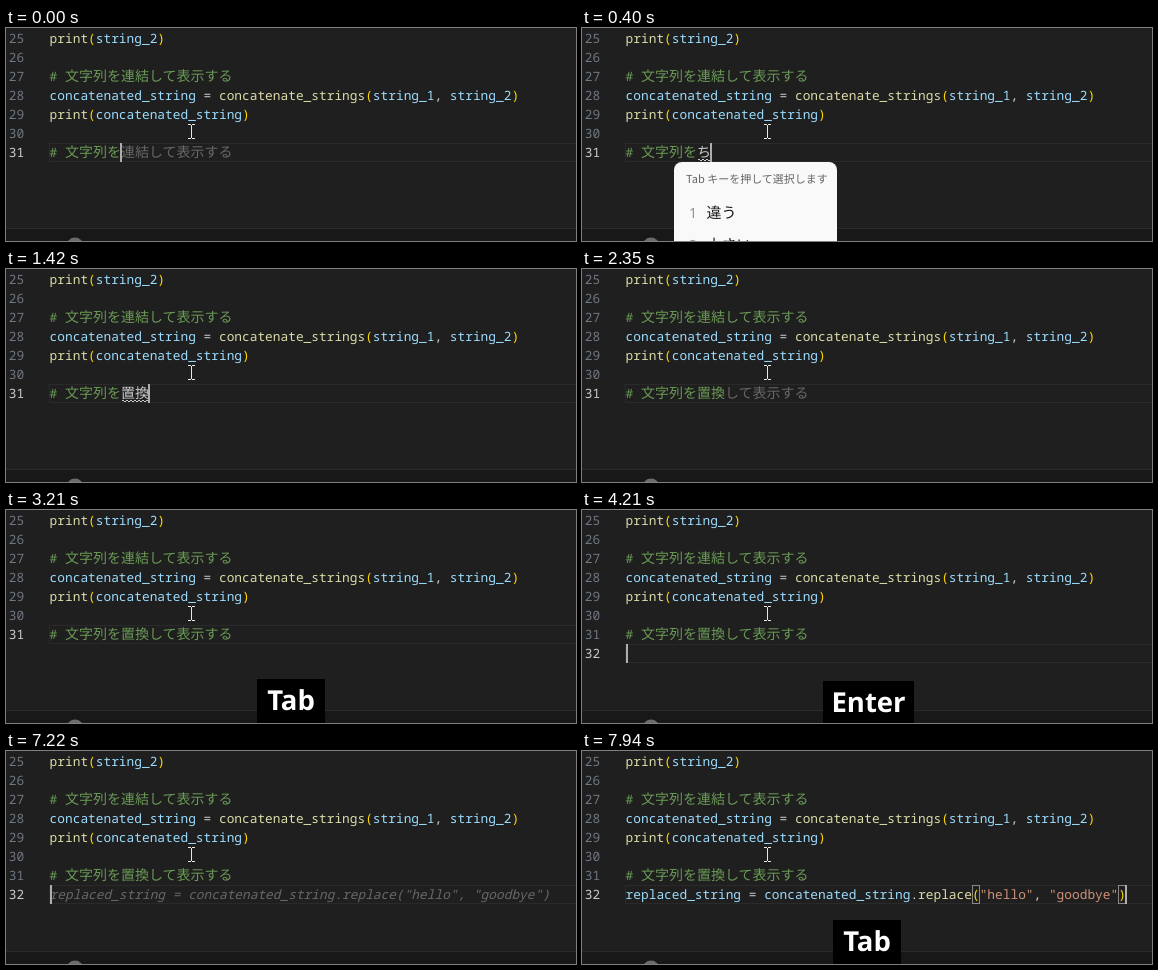
Write an HTML page with a canvas that moves like this. It is 570 px wide and 213 px high and loops after 8000 ms.

```html
<!DOCTYPE html>
<html lang="ja">
<head>
<meta charset="utf-8">
<style>
  html, body { margin: 0; width: 100%; height: 100%; overflow: hidden; background: #1f1f1f; }
  canvas { display: block; }
</style>
</head>
<body>
<canvas id="stage" width="570" height="213"></canvas>
<script>
const ctx = document.getElementById('stage').getContext('2d');
const LOOP = 8000, LEFT = 43.6, ROW = 19, CHAR = 7.7;
const MONO = '12.83px "Noto Sans Mono", monospace';
const KANJI = '14px "Noto Sans CJK JP", sans-serif';
const FG = '#cccccc', GHOST = '#686868', COMMENT = '#6a9955', GOLD = '#ffd700', BLUE = '#9cdcfe';
const NEW_CODE = 'replaced_string = concatenated_string.replace("hello", "goodbye")';

// Times at which the caret flips, starting visible
const BLINKS = [70, 330, 2350, 2680, 3210, 3680, 4740, 5210, 5670, 6220, 6690, 7220];
// [start, typed text, suggested rest]
const TYPING = [
  [0, '', '連結して表示する'], [330, 'ｔ', ''], [400, 'ち', ''], [800, 'ちｋ', ''], [870, 'ちか', ''],
  [1000, 'ちかｎ', ''], [1130, 'ちかん', ''], [1350, '置換', ''], [1620, '置換', 'して表示する'],
  [2680, '置換して表示する', '']
];
// [key, start, end, box x, box y, box width]
const KEYS = [
  ['Tab', 2680, 3610, 251, 169, 68], ['Enter', 4210, 5140, 241, 171, 91], ['Tab', 7480, LOOP, 251, 169, 68]
];

const rowTop = line => 1 + (line - 25) * ROW;
const baseline = line => rowTop(line) + 14;

function rect(x, y, w, h, color) {
  ctx.fillStyle = color;
  ctx.fillRect(x, y, w, h);
}

function frame(x, y, w, h, color) {
  ctx.strokeStyle = color;
  ctx.strokeRect(x + .5, y + .5, w - 1, h - 1);
}

function text(str, x, y, color, font = MONO) {
  ctx.font = font;
  ctx.fillStyle = color;
  ctx.fillText(str, x, y);
  return x + ctx.measureText(str).width;
}

function tokenColor(token, next, variable) {
  if (token[0] === '"') return '#ce9178';
  if (/[()]/.test(token)) return GOLD;
  if (/\w/.test(token)) return next === '(' ? '#dcdcaa' : variable;
  return FG;
}

function code(source, line, variable = BLUE) {
  let x = LEFT;
  for (const { 0: token, index } of source.matchAll(/"[^"]*"|\w+|[()]|[^\w"()]+/g)) {
    const next = source[index + token.length];
    x = text(token, x, baseline(line), tokenColor(token, next, variable));
  }
}

function comment(str, line) {
  const x = text('# ', LEFT, baseline(line), COMMENT);
  return text(str, x, baseline(line), COMMENT, KANJI);
}

function caret(x, line) {
  rect(x, rowTop(line), 2, ROW, '#aeafad');
}

function mouse() {
  rect(185, 97, 1, 13, '#e8e8e8');
  for (const y of [96, 110]) {
    rect(182, y, 3, 1, '#e8e8e8');
    rect(186, y, 3, 1, '#e8e8e8');
  }
}

function typedLine(t, blink) {
  const [, typed, rest] = TYPING.findLast(step => t >= step[0]);
  const composing = t >= 330 && t < 1890;
  const start = comment('文字列を', 31);
  const end = text(typed, start, baseline(31), composing ? FG : COMMENT, KANJI);
  text(rest, end, baseline(31), GHOST, KANJI);
  if (composing) {
    for (let x = Math.round(start) + 1; x < end - 1; x += 2) rect(x, 131 + (x >> 1) % 2, 2, 1, FG);
  }
  if (blink && t < 4210) caret(Math.round(end) - 1, 31);
}

function candidates(t) {
  const wide = t >= 1200;
  const words = wide ? ['置換', '置換術'] : t < 870 ? ['違う', '小さい'] : ['近く', '近い'];
  ctx.fillStyle = '#f9f9f9';
  ctx.beginPath();
  ctx.roundRect(92, 134, wide ? 178 : 163, 100, 8);
  ctx.fill();
  text('Tab キーを押して選択します', 104, 155, '#666666', '11px "Noto Sans CJK JP", sans-serif');
  words.forEach((word, i) => {
    const y = 190 + i * 32;
    text(i + 1, 107, y, '#8a8a8a', '14px "Open Sans", sans-serif');
    text(word, 124.5, y, '#1c1c1c', '15px "Noto Sans CJK JP", sans-serif');
  });
}

function newLine(t, blink) {
  if (t >= 7480) {
    code(NEW_CODE, 32, t < 7940 ? FG : BLUE);
    if (t >= 7550) {
      for (const col of [NEW_CODE.indexOf('('), NEW_CODE.length - 1]) {
        frame(Math.round(LEFT + col * CHAR), rowTop(32), 8, ROW, '#888888');
      }
    }
  } else if (t >= 4670) {
    text(NEW_CODE, LEFT, baseline(32), GHOST, 'italic ' + MONO);
  }
  if (blink) caret(t < 7480 ? 44 : 543, 32);
}

function keyLabel([key, start, end, x, y, w], t) {
  if (t < start || t >= end) return;
  rect(x, y, w, 213 - y, '#000000');
  ctx.textAlign = 'center';
  text(key, x + w / 2, y + 31, '#ffffff', 'bold 27.5px "Open Sans", sans-serif');
  ctx.textAlign = 'left';
}

function draw(t) {
  const blink = BLINKS.filter(time => t >= time).length % 2 === 0;
  const current = t < 4210 ? 31 : 32;

  rect(0, 0, 570, 213, '#1f1f1f');
  rect(0, 200, 570, 13, '#181818');
  rect(0, 200, 570, 1, '#2b2b2b');
  ctx.fillStyle = '#6b6b6b';
  ctx.beginPath();
  ctx.arc(69, 218, 8.5, 0, 7);
  ctx.fill();

  frame(43, rowTop(current), 530, ROW, '#2a2a2a');
  for (let line = 25; line <= current; line++) {
    text(line, 2.8, baseline(line), line === current ? FG : '#6e7681');
  }
  code('print(string_2)', 25);
  comment('文字列を連結して表示する', 27);
  code('concatenated_string = concatenate_strings(string_1, string_2)', 28);
  code('print(concatenated_string)', 29);
  mouse();

  typedLine(t, blink);
  if (t >= 400 && t < 1420) candidates(t);
  if (t >= 4210) newLine(t, blink);
  KEYS.forEach(key => keyLabel(key, t));
}

ctx.textRendering = 'geometricPrecision';
const begin = performance.now();
function tick() {
  draw((performance.now() - begin) % LOOP);
  requestAnimationFrame(tick);
}
tick();
</script>
</body>
</html>
```
